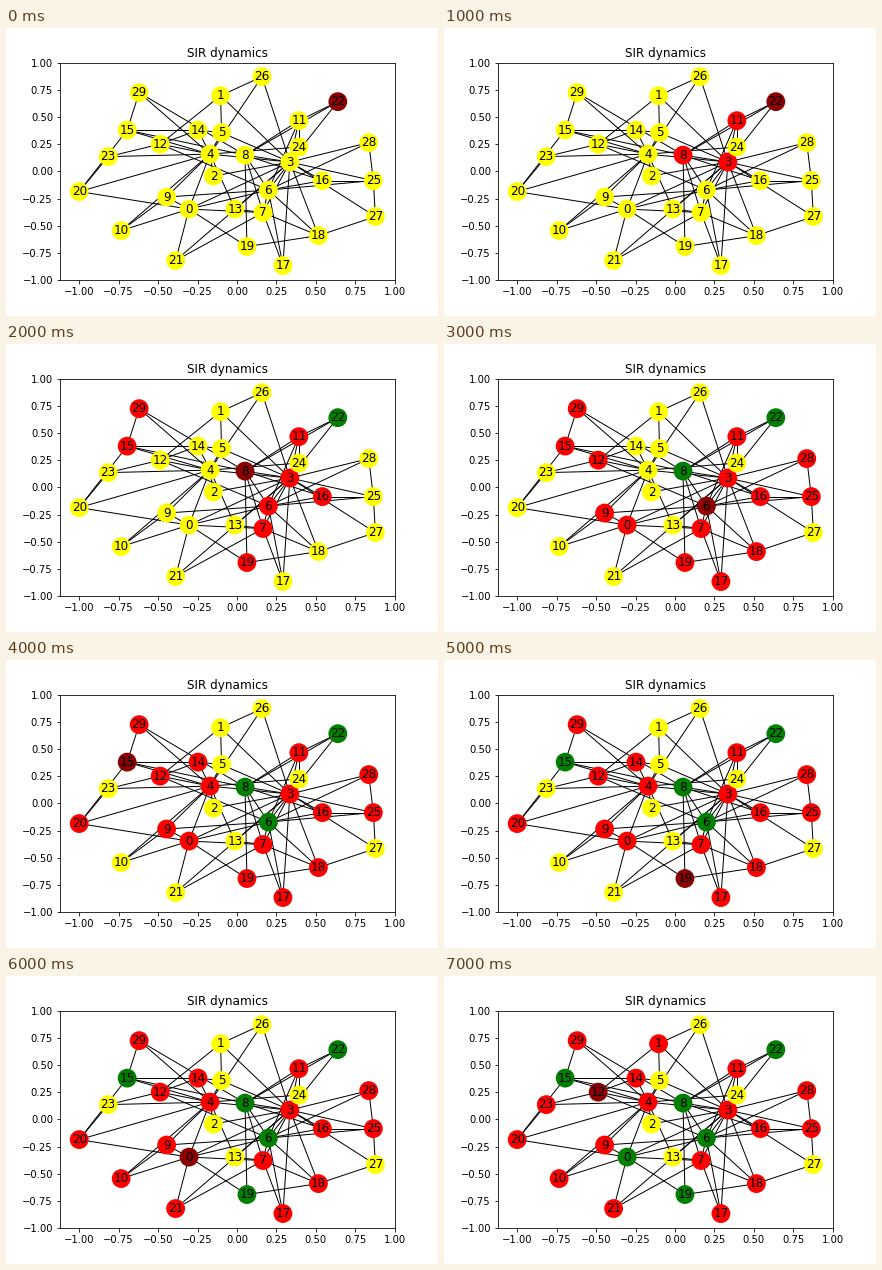
These frames come from a looping animation (432x288 px, 8 s). A matplotlib script:

```python
import math

import matplotlib.pyplot as plt
from matplotlib.animation import FuncAnimation
from matplotlib.collections import LineCollection

POINTS = [(-.304, -.347), (-.104, .697), (-.149, -.043), (.335, .086),
          (-.171, .159), (-.098, .357), (.199, -.172), (.165, -.379),
          (.051, .15), (-.446, -.236), (-.734, -.545), (.392, .467),
          (-.487, .251), (-.013, -.347), (-.247, .38), (-.696, .38),
          (.541, -.085), (.291, -.867), (.516, -.591), (.063, -.692),
          (-1, -.186), (-.389, -.821), (.639, .642), (-.816, .136),
          (.392, .224), (.864, -.085), (.158, .872), (.877, -.416),
          (.835, .265), (-.62, .725)]

# Spreading nodes in order of their turn, with the contacts they reach.
CONTACTS = {22: (3, 8, 11), 8: (6, 7, 15, 16, 19, 29),
            6: (0, 9, 12, 17, 18, 25, 28), 15: (4, 14, 20),
            19: (0, 18), 0: (10, 21), 12: (1, 23)}
NEVER = len(CONTACTS)
LINKS_BACK = 3

turn = {node: k for k, node in enumerate(CONTACTS)}
reached = {next(iter(CONTACTS)): 0}
for k, ends in enumerate(CONTACTS.values()):
    for node in ends:
        reached.setdefault(node, k)


def can_link(a, b):
    """A spreader only touches nodes infected by the end of its turn."""
    return (reached.get(a, NEVER) <= turn.get(b, NEVER)
            and reached.get(b, NEVER) <= turn.get(a, NEVER))


def build_edges():
    """Give each node links to earlier ones, favouring near and busy nodes."""
    edges = {(min(a, b), max(a, b)) for a, ends in CONTACTS.items() for b in ends}
    for node in range(LINKS_BACK, len(POINTS)):
        linked = {a for a, b in edges if b == node}
        free = [m for m in range(node) if m not in linked and can_link(m, node)]

        def pull(m):
            degree = sum(m in edge for edge in edges)
            return degree / math.dist(POINTS[m], POINTS[node]) ** 1.5

        free.sort(key=pull, reverse=True)
        missing = max(0, LINKS_BACK - len(linked))
        edges.update((m, node) for m in free[:missing])
    return sorted(edges)


def node_color(node, step):
    current = max(step - 1, 0)
    if turn.get(node, NEVER) < current:
        return "green"
    if turn.get(node) == current:
        return "darkred"
    if step and reached.get(node, NEVER) <= current:
        return "red"
    return "yellow"


fig, ax = plt.subplots(figsize=(6, 4), dpi=72)
fig.subplots_adjust(left=.125, right=.9, bottom=.125, top=.88)
ax.set_title("SIR dynamics", fontsize=12)
ax.set_xlim(-1.1216, 1)
ax.set_ylim(-1, 1.002)
ticks = [i / 4 for i in range(-4, 5)]
ax.set_xticks(ticks)
ax.set_yticks(ticks)

lines = [(POINTS[a], POINTS[b]) for a, b in build_edges()]
ax.add_collection(LineCollection(lines, colors="black", linewidths=1, zorder=1),
                  autolim=False)
nodes = ax.scatter(*zip(*POINTS), s=300, linewidths=1.5, zorder=2)
for i, (x, y) in enumerate(POINTS):
    ax.text(x, y, str(i), fontsize=12, ha="center", va="center", zorder=3)


def update(step):
    nodes.set_color([node_color(i, step) for i in range(len(POINTS))])
    return [nodes]


anim = FuncAnimation(fig, update, frames=8, interval=1000, repeat=True,
                     repeat_delay=0)
plt.show()
```
